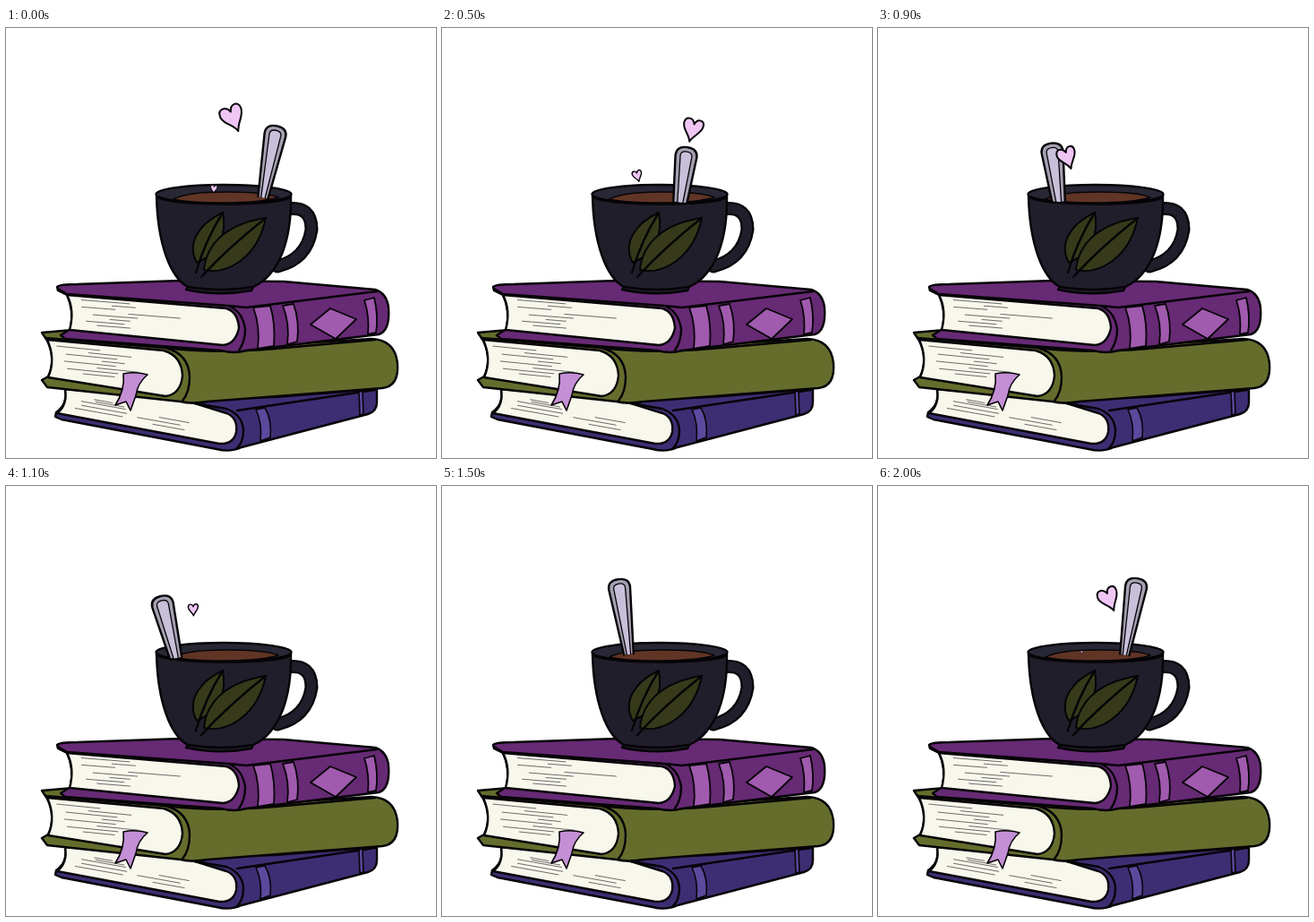
An HTML page for the animation above (2100 ms loop, 480 by 480 pixels).

```html
<!DOCTYPE html>
<html lang="en">
<head>
<meta charset="utf-8">
<title>Coffee and books</title>
<style>
html, body { margin: 0; width: 100%; height: 100%; overflow: hidden; background: #fff; }
svg { display: block; width: 100vw; height: 100vh; }
path, ellipse { stroke: #060407; stroke-width: 2.4; stroke-linejoin: round; stroke-linecap: round; }
.line { fill: none; }
.grain { fill: none; stroke: #4b4849; stroke-width: .8; }
.page { fill: #f8f7ec; }
.blue { fill: #3d2e74; }
.green { fill: #656d2d; }
.purple { fill: #672a75; }
.band { fill: #a05aae; stroke-width: 1.8; }
.stripe { fill: #5a4a9e; stroke-width: 1.6; }
.ribbon { fill: #c48fd5; stroke-width: 1.6; }
.cup { fill: #211e2b; }
.rim { fill: #282735; }
.grip { fill: none; stroke-width: 15; }
.grip + .grip { stroke: #211e2b; stroke-width: 10.5; }
.coffee { fill: #603525; stroke-width: 1.5; }
.leaf { fill: #363a1a; stroke-width: 2; }
.heart { fill: #efc6f3; vector-effect: non-scaling-stroke; }
#handle { fill: #a5a0b2; }
#groove { fill: #c8c0da; stroke-width: 1.3; }
</style>
</head>
<body>
<svg viewBox="0 0 480 480">
  <!-- blue book -->
  <path class="blue" d="M66 403Q69 420 56 429L55 434 62 437 235 470Q250 474 263 468L404 431Q414 428 414 418V403L300 412 200 414Z"/>
  <path class="page" d="M66 403Q69 421 57 430L238 464Q254 465 257 451Q259 435 246 430L195 414Z"/>
  <path class="line" d="M205 418L246 425Q264 432 265 449Q265 463 257 470M258 427L412 404"/>
  <path class="stripe" d="M279 426L289 424Q297 437 295 457L284 461Q286 440 279 426ZM394 406L398 405 399 431 395 432Z"/>
  <path class="grain"/>

  <!-- green book -->
  <path class="green" d="M40 340L75 337 260 356 408 347Q434 348 437 374Q439 400 420 402L225 417Q207 420 195 417L46 401 40 393 47 389Q56 370 46 349Z"/>
  <path class="page" d="M46 348Q56 370 47 390L178 411Q195 409 197 388Q196 366 176 360Z"/>
  <path class="line" d="M44 346L178 357Q204 364 205 389Q205 407 197 416M180 357Q230 364 300 358L412 348"/>
  <path class="grain"/>
  <path class="ribbon" d="M131 386Q144 383 158 387Q147 396 145 410L139 427 134 417 122 421Q133 404 131 386Z"/>

  <!-- purple book -->
  <path class="purple" d="M57 289Q60 286 80 286L195 282 310 283 412 292Q425 296 427 312Q429 338 416 342L268 360Q255 364 240 360L66 347 61 343 72 336Q76 315 68 298L58 293Z"/>
  <path class="page" d="M68 298Q77 315 71 337L242 354Q256 353 260 335Q259 317 246 313Z"/>
  <path class="line" d="M58 291L68 297 248 310Q264 316 267 336Q267 350 260 360M248 310L268 312 414 294"/>
  <path class="band" d="M276 312L295 310Q301 330 299 355L281 358Q284 333 276 312Z"/>
  <path class="band" d="M309 310L321 308Q328 328 325 350L314 353Q317 330 309 310Z"/>
  <path class="band" d="M400 304L411 301Q416 322 413 340L404 342Q406 322 400 304Z"/>
  <path class="band" d="M340 331L362 313 391 325 368 347Z"/>
  <path class="grain"/>

  <!-- cup -->
  <path class="grip" d="M314 202Q341 198 341 225Q336 258 303 266"/>
  <path class="grip" d="M314 202Q341 198 341 225Q336 258 303 266"/>
  <path class="cup" d="M168 187C169 240 183 278 203 289L201 292Q238 300 274 293L276 289C306 275 319 235 318 187Z"/>
  <ellipse class="rim" cx="243" cy="185.5" rx="75.5" ry="10.5"/>
  <path class="coffee" d="M187 191Q202 183 245 183Q290 183 304 189Q285 195 243 195Q203 195 187 191Z"/>
  <path class="line" d="M203 289Q240 295 276 289"/>
  <path class="leaf" d="M213 262C201 240 216 218 242 206C246 228 240 250 217 260Z"/>
  <path class="leaf" d="M221 270C224 238 250 218 290 212C281 256 247 276 221 270Z"/>
  <path class="line" d="M242 206Q222 238 212 273M290 212Q247 246 218 278"/>

  <path class="heart"/>
  <g id="spoon"><path id="handle"/><path id="groove"/></g>
  <path class="line" d="M168 188C174 199 312 200 318 188"/>
  <path class="heart"/>
  <path class="heart"/>
</svg>
<script>
const LOOP = 2100, STEP = 100, LIFE = 900;
const { sin, cos, min, max, PI } = Math;
const $ = id => document.getElementById(id);
const all = name => document.querySelectorAll(name);

// page blocks: inner left corner, size and slope of the paper edges
const pages = [
  { x: 72, y: 410, w: 165, h: 18, slope: .18 },
  { x: 56, y: 355, w: 125, h: 32, slope: .1 },
  { x: 77, y: 303, w: 165, h: 31, slope: .08 }
];
// size, tilt at mid-flight, and the way from the coffee upwards
const hearts = [
  { born: 1600, x: 260, y: 190, drift: -28, bend: 10, rise: 155, size: 1.1, tilt: -22 },
  { born: 1950, x: 227, y: 186, drift: 64, bend: 2, rise: 90, size: .95, tilt: 28 },
  { born: 270, x: 220, y: 170, drift: -11, bend: 0, rise: 33, size: .9, tilt: -28 }
];

let seed = 7;
const random = () => (seed = seed * 16807 % 2147483647) / 2147483647;

function paperEdges({ x, y, w, h, slope }) {
  let d = "";
  const rows = 8;
  for (let i = 0; i < rows; i++) {
    const len = 20 + 40 * random();
    const from = (w - len) * (i % 2 ? random() : random() * .2);
    d += `M${x + from} ${y + h * i / rows + from * slope}l${len} ${len * slope}`;
  }
  return d;
}

function drawSpoon(t) {
  const turn = 2 * PI * t / LOOP, a = turn - .44, sway = sin(2 * turn);
  const x = 239 + 53 * cos(a) + 5 * sway, y = 191 + 4 * sin(a);
  const dx = 239 + 70 * cos(a) + 2 * sway - x;
  const dy = 117 + 18 * sin(a) + 3 * sway - y;
  const len = Math.hypot(dx, dy), angle = Math.atan2(dx, -dy) * 180 / PI;
  const foot = 5 + max(0, 88 - len) / 10;
  const shape = (base, half, inset) =>
    `M${-base} 0L${-half} ${10 - len}Q${-half} ${inset - len} 0 ${inset - len}` +
    `Q${half} ${inset - len} ${half} ${10 - len}L${base} 0`;
  $("handle").setAttribute("d", shape(foot, 12, 0));
  $("groove").setAttribute("d", shape(foot * .4, 6.5, 5));
  $("spoon").setAttribute("transform", `translate(${x} ${y}) rotate(${angle})`);
}

function drawHeart(el, { born, x, y, drift, bend, rise, size, tilt }, t) {
  const u = (t - born + LOOP) % LOOP / LIFE;
  el.style.display = u < 1 ? "" : "none";
  const s = u * u * (3 - 2 * u), arc = sin(PI * s);
  const scale = size * min(1, 2 * u, 3.3 - 3 * u);
  el.setAttribute("transform",
    `translate(${x + drift * s + bend * arc} ${y - rise * s}) rotate(${tilt * arc}) scale(${scale})`);
  el.style.strokeWidth = min(2, max(0, scale * 3));
}

all(".grain").forEach((el, i) => el.setAttribute("d", paperEdges(pages[i])));
all(".heart").forEach(el => el.setAttribute("d",
  "M0 15C-3 6-12 3-12-5C-12-13-3-14 0-6C2-14 11-14 11-6C11 2 3 6 0 15Z"));

const start = performance.now();
function draw() {
  const t = Math.floor((performance.now() - start) % LOOP / STEP) * STEP;
  drawSpoon(t);
  all(".heart").forEach((el, i) => drawHeart(el, hearts[i], t));
  requestAnimationFrame(draw);
}
draw();
</script>
</body>
</html>
```
